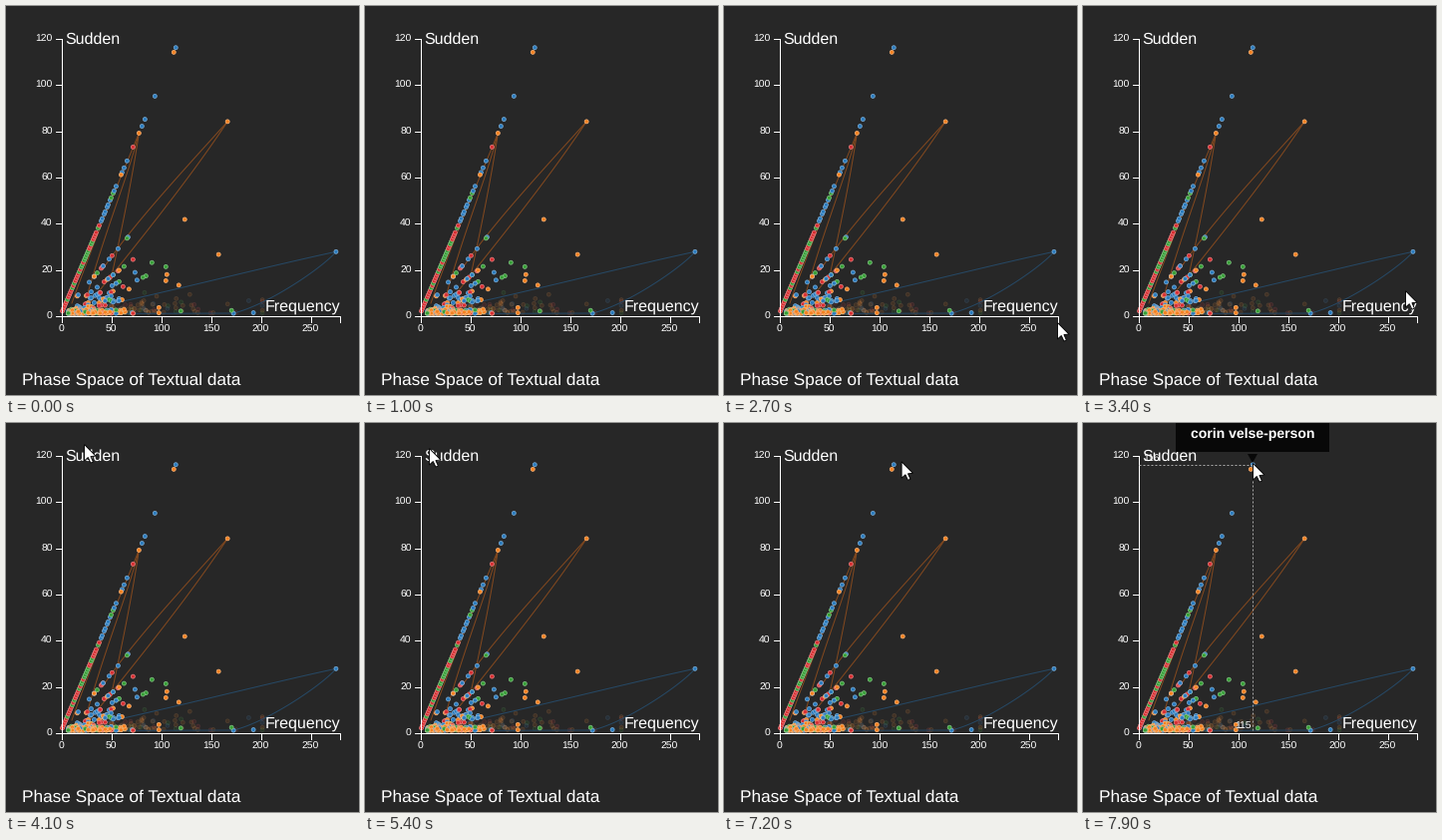
Write a matplotlib script that moves like this. It is 354 px wide and 390 px high and loops after 8000 ms.

```python
import numpy as np
import matplotlib.pyplot as plt
from matplotlib.animation import FuncAnimation
from matplotlib.colors import to_rgb
from matplotlib.patches import Polygon, Rectangle

W, H, DPI = 354, 390, 100
PX = 72 / DPI                      # one pixel in points
FRAMES, STEP = 80, 100
BG = "#272727"
INK = {"b": "#2a7cbf", "o": "#f58220", "g": "#36a036", "r": "#d92f32"}

plt.rcParams["font.family"] = ["Liberation Sans", "DejaVu Sans"]
plt.rcParams["text.hinting"] = "none"
fig = plt.figure(figsize=(W / DPI, H / DPI), dpi=DPI, facecolor=BG)
ax = fig.add_axes([0, 0, 1, 1])
ax.set(xlim=(0, W), ylim=(H, 0))
ax.axis("off")
rng = np.random.default_rng(5)


def sx(freq):
    return 55.5 + 0.998 * np.asarray(freq, float)


def sy(sudden):
    return 310.5 - 2.317 * np.asarray(sudden, float)


def spot(freq, n):
    """Every point lies on a ray: sudden = (freq + 1) / n."""
    freq = np.asarray(freq, float)
    return sx(freq), sy((freq + 1) / n)


def line(xs, ys, color="white", width=1, z=5, **kw):
    return ax.plot(xs, ys, color=color, lw=width * PX, zorder=z, **kw)[0]


def label(x, y, text, size, ha="left", va="baseline", z=8, **kw):
    return ax.text(x, y, text, fontsize=size * PX, color="white",
                   ha=ha, va=va, zorder=z, **kw)


def dots(xs, ys, keys, alpha=1.0, z=3):
    face = np.array([to_rgb(INK[k]) for k in keys])
    edge = face * 0.6 + 0.4
    ax.scatter(xs, ys, s=(4 * PX) ** 2, c=face, edgecolors=edge,
               linewidths=0.7 * PX, alpha=alpha, zorder=z)


def inks(mix, n):
    return rng.choice(list(mix), n)


def link(color, *pts):
    t = np.linspace(0, 1, 50)[:, None]
    p0, p1, p2, p3 = map(np.array, pts)
    xy = ((1 - t) ** 3 * p0 + 3 * t * (1 - t) ** 2 * p1
          + 3 * t ** 2 * (1 - t) * p2 + t ** 3 * p3)
    line(*xy.T, color=color, z=2)


def draw_axes():
    line([49.5, 55.5, 55.5, 49.5], [32.5, 32.5, 310.5, 310.5])
    line([55.5, 55.5, 334.5, 334.5], [316.5, 310.5, 310.5, 316.5])
    for v in range(0, 121, 20):
        y = np.floor(sy(v)) + 0.5
        line([49.5, 55.5], [y, y])
        label(46.7, y + 3.5, str(v), 10.4, "right")
    for v in range(0, 251, 50):
        x = np.floor(sx(v)) + 0.5
        line([x, x], [310.5, 316.5])
        label(x, 326.5, str(v), 10.4, "center")
    label(59, 38, "Sudden", 16)
    label(335, 306, "Frequency", 16, "right")
    label(15.5, 379, "Phase Space of Textual data", 17.2)


def draw_links():
    brown, navy = "#84491f", "#264966"
    peak, side, far = spot(78, 1), spot(167, 2), spot(276, 10)
    link(brown, peak, (118, 165), (92, 225), (66, 298))
    link(brown, peak, (121, 175), (103, 215), (82, 288))
    link(brown, peak, (127, 170), (117, 220), (105, 275))
    link(brown, side, (175, 168), (125, 222), (97, 264))
    link(brown, side, (182, 176), (138, 230), (82, 300))
    link(navy, far, (258, 262), (170, 285), (72, 306))
    link(navy, far, (318, 262), (262, 300), (228, 308))
    line([72, 228], [308.5, 308], color=navy, z=2)


def draw_haze():
    freq = np.minimum(35 + rng.gamma(1.6, 38, 90), 202)
    dots(sx(freq), sy(1 + rng.exponential(2.6, 90)), inks("oooobgr", 90), 0.13, 1)


def draw_crowd():
    freq = np.round(7 + rng.exponential(18, 230))
    freq = freq[freq < 85]
    n = np.ceil((freq + 1) * rng.uniform(0.35, 1, len(freq)))
    dots(*spot(freq, n), inks("oooooobbgr", len(freq)))


def draw_rays():
    # colours along the steep ray shift from red to green to blue
    freq = np.arange(1, 56)
    freq = freq[(freq < 36) | (freq % 3 > 0)]
    mixes = ["rrrrrrg", "rrrggo", "bbbog"]
    keys = [inks(mixes[min(f // 20, 2)], 1)[0] for f in freq]
    dots(*spot(freq, 1), keys)

    for n in range(2, 11):
        count = 16 - n
        freq = np.round(14 + 52 * rng.beta(1.3, 1.6, count))
        dots(*spot(freq, n), inks("bbbbogrr", count))


def draw_outliers():
    # (frequency, ray) of the points that stand apart
    apart = {
        "b": [(115, 1), (94, 1), (84, 1), (81, 1), (66, 1), (63, 1), (61, 1),
              (67, 2), (276, 10), (74, 4), (76, 5), (193, 150), (173, 170)],
        "o": [(113, 1), (78, 1), (60, 1), (167, 2), (124, 3), (158, 6),
              (106, 6), (105, 7), (118, 9), (68, 6), (98, 28), (98, 80)],
        "g": [(66, 2), (63, 3), (91, 4), (105, 5), (85, 5), (82, 5),
              (171, 75), (120, 60)],
        "r": [(72, 1), (72, 3)],
    }
    for key, pts in apart.items():
        freq, n = np.array(pts).T
        dots(*spot(freq, n), key * len(pts), z=4)


def make_tooltip():
    dash = dict(color="#a8a8a8", z=6, dashes=(2, 2))
    x, y = spot(115, 1)
    black = dict(fc="#080808", ec="none", zorder=9)
    return [
        line([55.5, x], [y, y], **dash),
        line([x, x], [y, 310], **dash),
        label(60, 38.5, "116", 10.4),
        label(152, 306, "115", 10.4),
        ax.add_patch(Rectangle((93, -2), 154, 30.5, **black)),
        ax.add_patch(Polygon([(165, 31), (175, 31), (170, 40)], **black)),
        label(170, 15, "corin velse-person", 14, "center", z=10, weight="bold"),
    ]


ARROW = np.array([(0, 0), (0, 16.5), (3.8, 13), (6.4, 18.6), (8.9, 17.4),
                  (6.4, 12), (11.5, 11.6)])
# pointer stops: frame, x, y
PATH = np.array([(24, 339, 131), (27, 334, 317), (32, 334, 297), (33, 334, 297),
                 (41, 78, 21), (42, 86, 22), (46, 64, 25), (62, 64, 25),
                 (65, 125, 14), (71, 179, 38), (75, 170, 40)])


def pointer_at(i):
    frames = PATH[:, 0]
    k = np.clip(np.searchsorted(frames, i, "right") - 1, 0, len(PATH) - 2)
    t = np.clip((i - frames[k]) / (frames[k + 1] - frames[k]), 0, 1)
    ease = t * t * (3 - 2 * t)
    return PATH[k, 1:] + (PATH[k + 1, 1:] - PATH[k, 1:]) * ease


for draw in (draw_axes, draw_links, draw_haze, draw_rays, draw_crowd, draw_outliers):
    draw()
tooltip = make_tooltip()
pointer = ax.add_patch(Polygon(ARROW, fc="white", ec="black", lw=0.9 * PX, zorder=20))


def update(i):
    pointer.set_visible(i >= PATH[0, 0])
    pointer.set_xy(ARROW + pointer_at(i) + 0.5)
    for part in tooltip:
        part.set_visible(i == FRAMES - 1)
    return [pointer, *tooltip]


anim = FuncAnimation(fig, update, frames=FRAMES, interval=STEP,
                     repeat=True, repeat_delay=0, blit=False)
plt.show()
```
